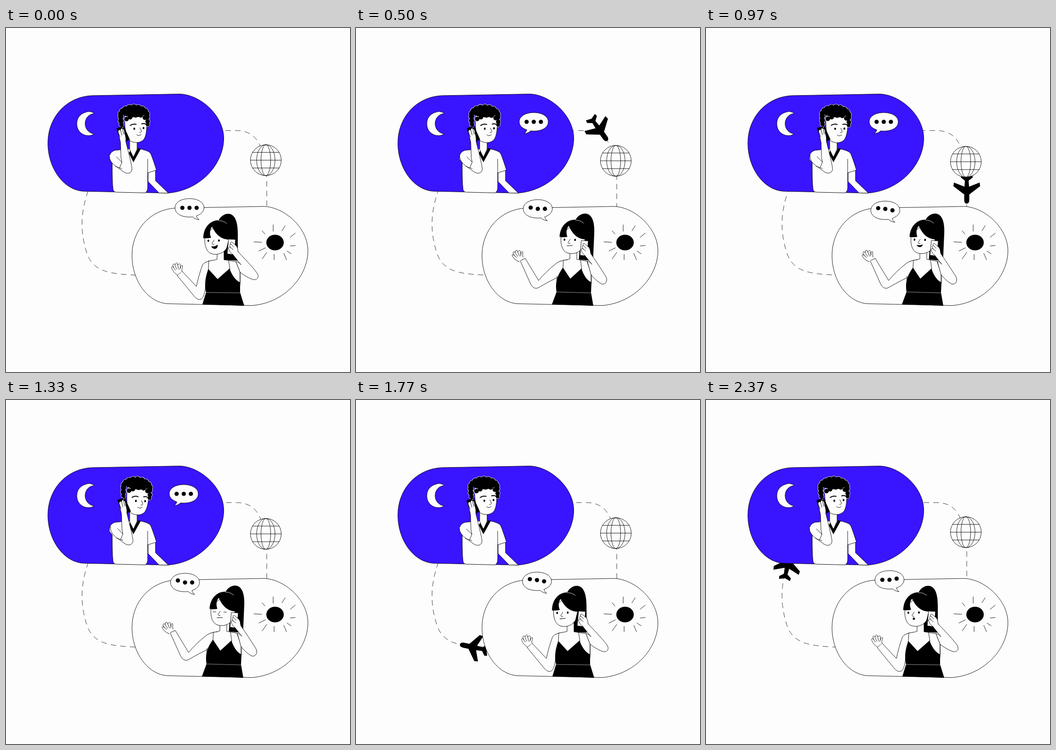
Recreate the animation shown at these times as an HTML page. Size 748x748 px, loop 2410 ms.

```html
<!DOCTYPE html>
<html lang="en">
<head>
<meta charset="utf-8">
<title>Long distance call</title>
<style>
  html, body { margin: 0; width: 100%; height: 100%; overflow: hidden; background: #fdfdfd; }
  svg { display: block; width: 100vw; height: 100vh; }
  .line { fill: none; stroke: #000; stroke-width: .9; stroke-linecap: round; stroke-linejoin: round; }
  .skin { fill: #fdfdfd; stroke: #000; stroke-width: .9; stroke-linejoin: round; }
  .dash { fill: none; stroke: #222; stroke-width: .9; stroke-dasharray: 12 9; }
  .night { fill: #3914ff; stroke: #000; stroke-width: .9; }
</style>
</head>
<body>
<svg viewBox="0 0 748 748">
  <defs>
    <path id="pill" d="M186 147L377 143.5C421 144 473.500 189 473.500 240C473.500 294 425 353 352 359L168 355C125 352 91 305 91 250C91 195 130 150 186 147Z"/>
    <g id="bubble">
      <path class="skin" d="M-15 17.5C-16 21 -18 24 -21 26C-15 25 -10 23 -7 19.7C18 22 31.500 12 31.500 0C31.500 -12 18 -20 0 -20C-18 -20 -31.500 -12 -31.500 0C-31.500 8 -25 14 -15 17.500Z"/>
    </g>
  </defs>

  <path id="routeA" class="dash" d="M400 223H500C528 223 545 235 555 262C565 290 567 310 567 330V480"/>
  <path id="routeB" class="dash" d="M360 540L275 537C225 534 190 530 176 490C160 440 163 400 178 356L190 298"/>
  <path id="plane" d="M0 0C0 -4 -4 -5.500 -9 -5.500H-20L-38 -29L-46 -28L-37 -5L-50 -4L-57 -13L-63 -12L-59 0L-63 12L-57 13L-50 4L-37 5L-46 28L-38 29L-20 5.500H-9C-4 5.500 0 4 0 0Z"/>

  <g id="globe">
    <circle class="skin" r="33.500"/>
    <ellipse class="line" rx="20" ry="33.500"/>
    <ellipse class="line" rx="10.500" ry="33.500"/>
    <path class="line" d="M-33.500 0H33.500M-29 -17H29M-29 17H29"/>
  </g>

  <use href="#pill" class="night"/>
  <use href="#pill" class="skin" x="183" y="244.500"/>

  <path class="skin" d="M192 186C186 181 179 181 174 183C160 187 154 197 154 208C154 223 165 234 180 234C185 234 189 232 191 230C181 229 172 220 172 208C172 196 180 187 192 186Z"/>

  <!-- caller at night -->
  <g>
    <path class="skin" d="M309 313V334L333 358.700L353 359L325 332V309Z"/>
    <path class="skin" d="M267 263L237 266C227 269 224 277 225 286L231 293C231 315 231 338 233 352Q235 357 240 357L303 358.500Q308 354 308 349V315L327 309C323 296 319 284 315 274C312 268 304 266 292 263Z"/>
    <path class="skin" d="M269 240V264L277 282L285 263V244Z"/>
    <path d="M267 272L277 292L293 263L287 261.500L277 280L270 267Z"/>
    <path class="line" d="M308 315V285"/>
    <g id="manHead">
      <path class="skin" d="M258 186C257 222 262 240 271 246C281 251 295 250 301 240C306 230 307 215 305 186Z"/>
      <g id="curls"></g>
      <ellipse cx="279" cy="219" rx="1.900" ry="2.500"/>
      <ellipse cx="299" cy="217.500" rx="1.900" ry="2.500"/>
      <path class="line" style="stroke-width:2" d="M270 212Q276 207.500 283 209.500M295 208.500Q300 206.500 305 209.500"/>
      <path class="line" d="M291 217L294.500 224Q295 227 290.500 227M284 232Q289 236 294 231.500"/>
    </g>
    <g id="manHand">
      <path d="M240 218L256 213L269.500 243L260 247L246 235Z"/>
      <path class="skin" d="M225 276C224 287 231 295 238 300L256 313C263 318 272 317 274 308C274 300 267 273 260.500 247C261 240 260 234 258 229C258 223 256 219 253.500 219C251 217 249 219 249 222C246 220 243 223 244 227L249 249L250 282L252 292L240 280"/>
      <path class="line" d="M249 222L252 233M253.500 220L256 231M244 227L248 237M238 301L252 306M252 292L247 304"/>
      <circle cx="254" cy="216" r="1" fill="#fdfdfd"/>
    </g>
  </g>
  <g id="talkA">
    <use href="#bubble"/>
    <g class="dots"></g>
  </g>

  <!-- caller at daytime -->
  <ellipse cx="585" cy="466.500" rx="19" ry="17"/>
  <path class="line" d="M581 428V442M607 430L600 441M629 446L618 455M629 473L618 474M620 491L611 485M610 504L604 490M583 492L583 504M557 502L567 488M550 485L564 478M539 465L556 466M557 441L563 448"/>
  <g id="hairBack">
    <path d="M460 424C464 410 475 403 485 404C499 406 504 424 504 446V506L473 504L475 450Z"/>
  </g>
  <path id="chest" class="skin"/>
  <path id="arm" class="skin"/>
  <g id="hand">
    <path class="skin" d="M-8 3C-16 -2 -20 -9 -21 -14C-21 -17 -18 -17 -16 -13L-18 -19C-18 -23 -14 -23 -13 -19L-12 -22C-11 -26 -7 -25 -7 -20L-5 -21C-3 -24 0 -22 -1 -18L-1 -12C0 -17 2 -20 4 -18C5 -15 1 -9 3 -5"/>
    <path class="line" d="M-16 -13L-12 -8M-13 -18L-9 -10M-7 -20L-5 -11M-1 -12L-4 -9"/>
  </g>
  <path id="dress"/>
  <path id="straps" class="line"/>
  <path id="seam" class="line" style="stroke:#fdfdfd;stroke-width:.6"/>
  <g id="herHead">
    <path class="skin" d="M433 450C430 470 435 486 446 490.500C459 495 474 490 480 478L487 450L462 425Z"/>
    <path d="M429 457C429 434 444 417 464 418C478 419 485 432 487 447L490 460C473 461 459 455 448 432C442 440 443 449 446 456Q438 458 429 457Z"/>
    <path class="line" style="stroke:#fdfdfd;stroke-width:.8" d="M462 419Q472 418 480 425"/>
    <g id="eyes">
      <ellipse cx="440" cy="462.500" rx="1.900" ry="2.500"/>
      <ellipse cx="463" cy="462" rx="1.900" ry="2.500"/>
    </g>
    <path id="lids" class="line" d="M437 463H443M460 462.500H466"/>
    <path class="line" d="M452.500 461L448 468.500Q449 471.500 452.500 470.500"/>
    <path id="mouth" class="line" style="stroke-width:1.100"/>
  </g>
  <g id="herPhone">
    <path class="skin" d="M484 459L499 460L496 493L481 491Z"/>
  </g>
  <path id="elbow" class="skin"/>
  <g id="herHand">
    <path class="skin" d="M493 492C488 489 485 484 484 479C484 476 487 476 489 478C485 473 486 470 489 470C486 466 490 464 493 467L501 474C504 478 504 483 505 488"/>
    <path class="line" d="M489 470L495 476M489 478L494 482"/>
  </g>
  <g id="talkB">
    <use href="#bubble" transform="scale(-1 1)"/>
    <g class="dots"></g>
  </g>
</svg>
<script>
const LOOP = 2410, NS = 'http://www.w3.org/2000/svg';
const $ = id => document.getElementById(id);
const move = (id, v) => $(id).setAttribute('transform', v);
const shape = (id, d) => $(id).setAttribute('d', d);
const show = (el, on) => el.setAttribute('visibility', on ? 'visible' : 'hidden');

function add(parent, name, attrs) {
  const el = document.createElementNS(NS, name);
  for (const k in attrs) el.setAttribute(k, attrs[k]);
  return parent.appendChild(el);
}

// Value at time t from [time, value] stops, eased unless linear.
function key(t, stops, linear) {
  if (t <= stops[0][0]) return stops[0][1];
  for (let i = 1; i < stops.length; i++) {
    const [t0, a] = stops[i - 1], [t1, b] = stops[i];
    if (t <= t1) {
      const u = (t - t0) / (t1 - t0);
      return a + (b - a) * (linear ? u : u * u * (3 - 2 * u));
    }
  }
  return stops[stops.length - 1][1];
}

// Blend two path strings of equal structure.
function mix(a, b, p) {
  const to = b.match(/-?[\d.]+/g);
  let i = 0;
  return a.replace(/-?[\d.]+/g, n => (+n + (to[i++] - n) * p).toFixed(2));
}

function makeCurls() {
  const spots = [[250, 202, 6], [251, 210, 5], [308, 203, 5], [308, 210, 4],
    [262, 198, 5], [270, 194, 5], [282, 190, 5], [293, 190, 5], [302, 195, 5]];
  for (let i = 0; i < 11; i++) {
    const a = Math.PI * (0.95 + i * 1.1 / 10);
    spots.push([278 + 29 * Math.cos(a), 190 + 18.5 * Math.sin(a), 6]);
  }
  const g = $('curls');
  for (const [cx, cy, r] of spots)
    add(g, 'circle', { cx, cy, r, stroke: '#fdfdfd', 'stroke-width': 1.6 });
  for (const [cx, cy, r] of spots) add(g, 'circle', { cx, cy, r });
  add(g, 'ellipse', { cx: 278, cy: 183, rx: 28, ry: 11 });
}
makeCurls();

const dots = ['talkA', 'talkB'].map(id => {
  const g = $(id).querySelector('.dots');
  return [-15.5, 0, 15.5].map(cx => add(g, 'circle', { cx, cy: 0, r: 4.6 }));
});
function bounce(row, phase, peaks) {
  row.forEach((dot, i) => {
    const d = Math.abs(phase - peaks[i]);
    dot.setAttribute('cy', d < 80 ? -5 * Math.cos(d / 80 * Math.PI / 2) : 0);
  });
}

const pose = {
  arm: ['M450 505C438 507 430 510 427 516C421 532 417 548 414 562L383 529L372 538L409 583C415 590 420 592 425 589C429 586 431 580 433 570L435 545',
        'M460 504C448 505 440 508 434 513C420 524 408 536 397 549L368 501L357 506L379 555C383 564 389 568 396 565C405 560 418 552 437 543L437 540'],
  chest: ['M459 485V503C450 506 440 506 432 511L434 560H509V531L500 508L474 504V485Z',
          'M465 485V502C456 505 447 505 439 510L436 560H511V533L502 507L480 503V485Z'],
  dress: ['M440 524L460 546L486 523C491 537 499 549 509 553L509 575L518 604L427 601L435 575C431 556 434 540 440 524Z',
          'M450 521L466 545L490 523C495 537 502 549 512 553L511 575L516 604L426 601L436 574C433 556 436 540 450 521Z'],
  straps: ['M441 506L440 526M484 505L487 525M509 531V554', 'M451 505L450 523M488 504L491 525M512 536V554'],
  seam: ['M435 575L509 576', 'M437 574L511 576'],
  elbow: ['M505 487C520 503 535 518 546 533C551 541 547 549 537 547C526 543 515 536 509 531L500 508Q507 509 511 515L493 492',
          'M510 490C522 507 533 524 543 540C548 548 544 558 535 557C526 552 518 545 511 536L503 507Q509 508 513 514L498 495']
};

const mouths = {
  smile: ['M447 475Q454 477 460 472Q460 479 454 480Q449 479 447 475Z', '#000'],
  grin: ['M446 474.500Q452 475.500 458 473Q456 477.500 452 477.500Q448 477.500 446 474.500Z', '#000'],
  round: ['M452 473.500a2 2 0 1 1 -.1 4a2 2 0 1 1 .1 -4Z', '#000'],
  flat: ['M446 475.500L458 474.500', 'none']
};
const speech = [[0, 'smile'], [190, 'round'], [500, 'flat'], [830, 'grin'], [1200, 'flat'],
  [1480, 'round'], [1640, 'flat'], [1920, 'smile'], [2180, 'round'], [2390, 'smile']];

function flyPlane(t) {
  const first = t < 1400;
  const route = $(first ? 'routeA' : 'routeB');
  const s = first
    ? key(t, [[100, 5], [330, 96], [670, 211], [970, 294], [1330, 400]], true)
    : key(t, [[1450, 4], [1770, 134], [2370, 366], [2410, 380]], true);
  const p = route.getPointAtLength(s), q = route.getPointAtLength(s - 3);
  const turn = Math.atan2(p.y - q.y, p.x - q.x) * 180 / Math.PI;
  move('plane', `translate(${p.x} ${p.y}) rotate(${turn})`);
  show($('plane'), t > 110 && (t < 1340 || t > 1460));
}

function draw(t) {
  const wave = Math.cos(2 * Math.PI * t / LOOP);
  const flow = 11 * 21 * t / LOOP;
  $('routeA').style.strokeDashoffset = -77 - flow;
  $('routeB').style.strokeDashoffset = -77 - flow;
  flyPlane(t);
  move('globe', `translate(565 ${289.3 - 1.9 * wave})`);

  const tilt = key(t, [[400, 0], [600, 3], [1000, 3], [1250, 5.5], [1430, 5.5], [1700, 0]]);
  move('manHead', `rotate(${tilt} 276 255)`);
  move('manHand', `translate(${tilt * 0.4} ${-tilt * 0.15})`);

  const pop = key(t, [[200, 0], [330, 0.77], [430, 1], [1450, 1], [1620, 0]], true);
  const lean = 1 - pop;
  move('talkA', `translate(${386.5 - 2 * lean} ${204 + 70 * lean}) rotate(${60 * lean}) scale(${pop})`);
  show($('talkA'), pop > 0.01);
  bounce(dots[0], t % 803, [630, 680, 760]);

  move('talkB', `translate(${394 + 5 * wave} ${394 - 3 * wave})`);
  bounce(dots[1], t % (LOOP / 6), [150, 215, 310]);

  const p = key(t, [[40, 0], [460, 1], [1400, 1], [1700, 0]]);
  for (const id in pose) shape(id, mix(pose[id][0], pose[id][1], p));
  move('hand', `translate(${380 - 18 * p} ${534 - 30 * p}) rotate(${-12 * p}) scale(.95)`);
  const h = p + key(t, [[1550, 0], [1750, -0.2], [1900, -0.2], [2200, 0]]);
  const head = `translate(${11.5 * h} ${-h}) rotate(${2.5 * h} 470 505)`;
  move('herHead', head);
  move('hairBack', head);
  move('herPhone', `translate(${6 * p} ${3 * p})`);
  move('herHand', `translate(${5.5 * p} ${3 * p})`);

  const word = speech.filter(s => s[0] <= t).pop()[1];
  shape('mouth', mouths[word][0]);
  $('mouth').style.fill = mouths[word][1];
  const blink = t > 1270 && t < 1400;
  show($('eyes'), !blink);
  show($('lids'), blink);
}

const start = performance.now();
function tick() {
  draw((performance.now() - start) % LOOP);
  requestAnimationFrame(tick);
}
tick();
</script>
</body>
</html>
```
